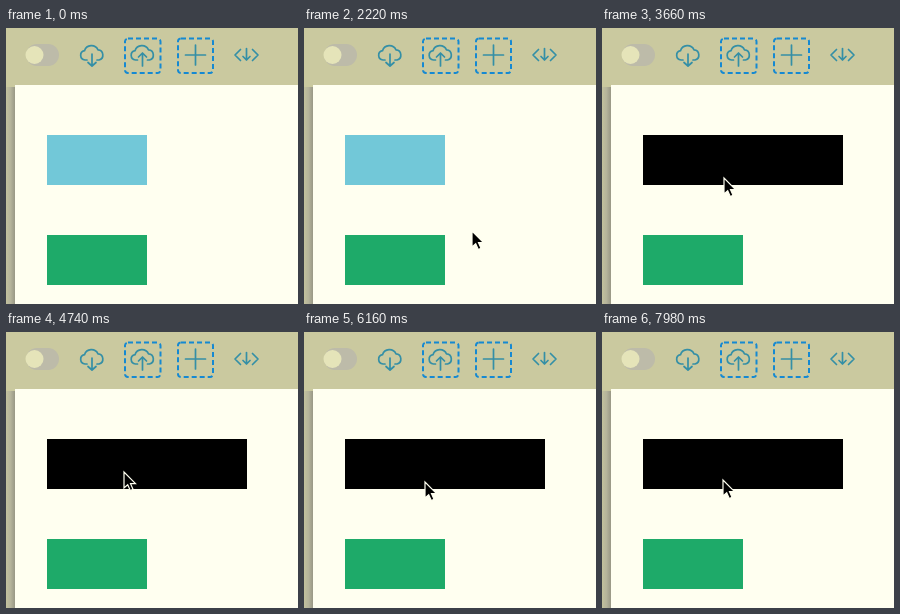
These frames come from a looping animation (292x276 px, 8000 ms). An HTML page:

```html
<!DOCTYPE html>
<html lang="en">
<head>
<meta charset="utf-8">
<title>Hover demo</title>
<style>
html, body { margin: 0; width: 100%; height: 100%; overflow: hidden; background: #cac99f; }
svg { display: block; }
.icon { fill: none; stroke: #348fa6; stroke-width: 1.7; stroke-linecap: round; stroke-linejoin: round; }
.frame { fill: none; stroke: #1589d2; stroke-width: 2; stroke-dasharray: 5 3; }
</style>
</head>
<body>
<svg width="292" height="276" viewBox="0 0 292 276">
  <defs>
    <linearGradient id="shade">
      <stop offset="0" stop-color="#c2c19d"/>
      <stop offset=".5" stop-color="#b5b49b"/>
      <stop offset="1" stop-color="#999886"/>
    </linearGradient>
    <path id="cloud" d="M-5 5h-2a4.7 4.7 0 0 1-.5-9.3A7.3 7.3 0 0 1 6-5.2 5.2 5.2 0 0 1 7 5H5"/>
  </defs>
  <rect width="292" height="276" fill="#cac99f"/>
  <rect y="59" width="9" height="217" fill="url(#shade)"/>
  <rect x="9" y="57" width="283" height="219" fill="#fffff0"/>

  <rect x="20" y="16" width="33" height="22" rx="11" fill="#bdbba9"/>
  <circle cx="28.5" cy="27" r="9" fill="#e5e4b9"/>

  <rect class="frame" x="119" y="10.5" width="35.5" height="34.5" rx="3"/>
  <rect class="frame" x="172" y="10.5" width="35" height="34.5" rx="3"/>
  <g class="icon">
    <g transform="translate(86 27)"><use href="#cloud"/><path d="M0-1V11M-4 7.5 0 11 4 7.5"/></g>
    <g transform="translate(136.5 27)"><use href="#cloud"/><path d="M0 11V-2M-4 2 0-2 4 2"/></g>
    <path d="M179.5 27h20M189.5 17v20"/>
    <path d="M234.5 21.5 229 27l5.500 5.500M246.500 21.500 252 27l-5.500 5.500M240.500 20.500v11.500M237 28.500l3.500 3.500 3.500-3.500"/>
  </g>

  <rect id="box" x="41" y="107" height="50"/>
  <rect x="41" y="207" width="100" height="50" fill="#1eaa69"/>
  <path id="cursor" d="M0 0V16L3.700 12.700 6.300 18.500 9 17.300 6.500 11.700H11.500Z"
    fill="#000" stroke="#fffff0" stroke-width="1.2"/>
</svg>
<script>
const LOOP = 8000;
const box = document.getElementById('box');
const cursor = document.getElementById('cursor');

// Pointer path: time, x, y
const path = [
  [1680, 152, 278], [1900, 163, 240], [2220, 168, 203], [2500, 162, 196],
  [2900, 138, 174], [3240, 125, 162], [3340, 125, 162], [3640, 122, 150],
  [4080, 119, 141], [4740, 118, 140], [5020, 118, 143], [5480, 121, 158],
  [5760, 122, 166], [6080, 121, 150], [6350, 122, 150], [6600, 124, 167],
  [7120, 125, 172], [7440, 124, 171], [7700, 122, 154], [7980, 121, 148], [LOOP, 121, 148]
];

function pointer(t) {
  const i = path.findIndex(p => p[0] > t);
  if (i < 1) return null;
  const [t0, x0, y0] = path[i - 1], [t1, x1, y1] = path[i];
  const k = (t - t0) / (t1 - t0);
  return [x0 + (x1 - x0) * k, y0 + (y1 - y0) * k].map(Math.round);
}

function draw(now) {
  const p = pointer(now % LOOP);
  const hover = p && p[1] < 157;
  box.setAttribute('width', hover ? 200 : 100);
  box.setAttribute('fill', hover ? '#000' : '#72c8d8');
  cursor.style.display = p ? '' : 'none';
  if (p) cursor.setAttribute('transform', `translate(${p})`);
  requestAnimationFrame(draw);
}
draw(0);
</script>
</body>
</html>
```
